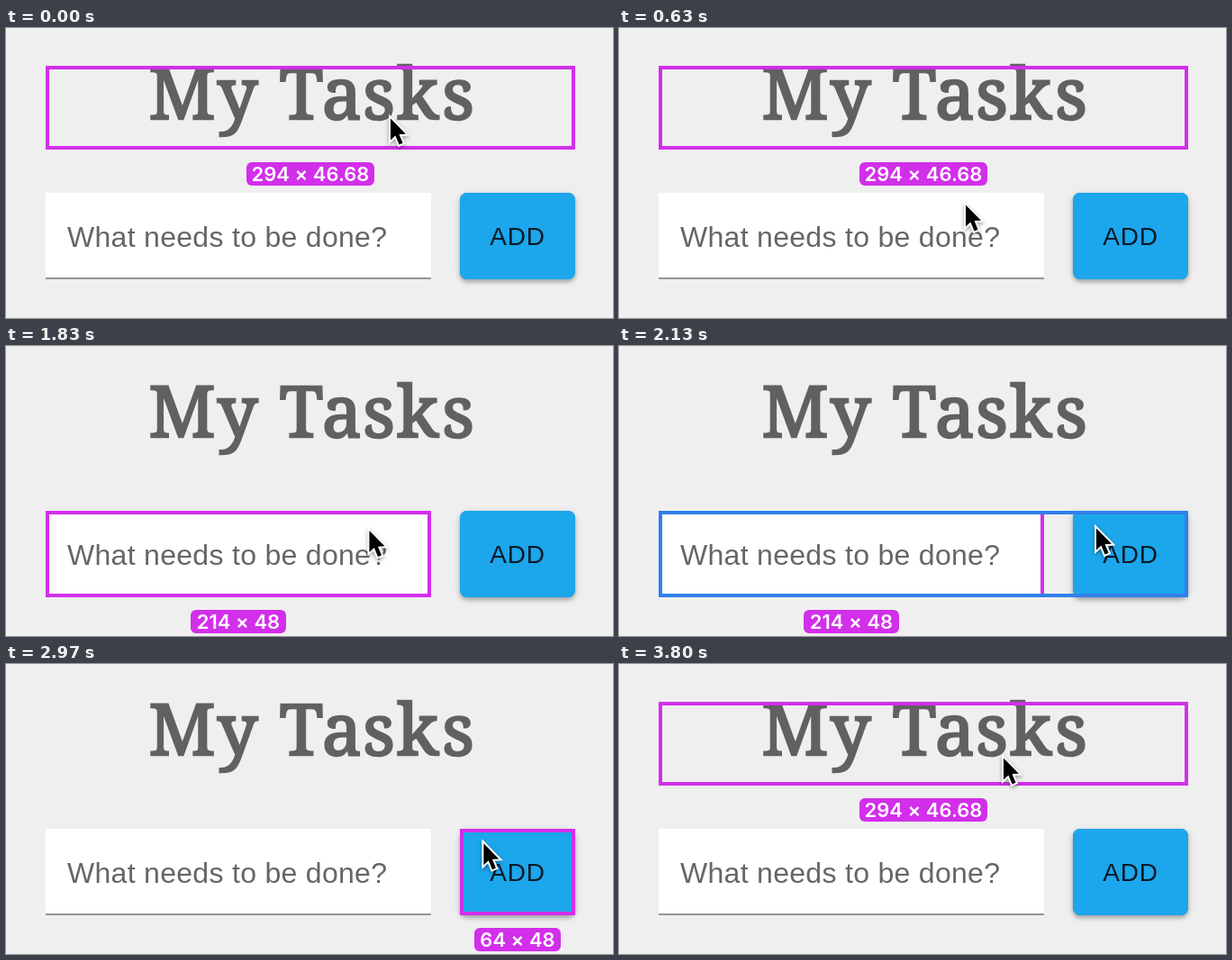
These frames come from a looping animation (674x322 px, 4230 ms). An HTML page with a canvas:

```html
<!DOCTYPE html>
<html lang="en">
<head>
<meta charset="utf-8">
<title>My Tasks</title>
<style>
  html, body { margin: 0; width: 100%; height: 100%; overflow: hidden; background: #efefef; }
  canvas { display: block; }
</style>
</head>
<body>
<canvas id="stage" width="674" height="322" aria-label="My Tasks"></canvas>
<script>
const ctx = document.getElementById('stage').getContext('2d');
const LOOP = 4230;
const PINK = '#d22fea', BLUE = '#317fec', GREY = '#616161';

const TITLE = { x: 44, y: 42, w: 588, h: 93, label: '294 × 46.68', lx: 267, ly: 149, lw: 142 };
const INPUT = { x: 44, y: 183, w: 428, h: 96, label: '214 × 48', lx: 205, ly: 293, lw: 106 };
const BUTTON = { x: 504, y: 183, w: 128, h: 96, label: '64 × 48', lx: 520, ly: 293, lw: 96 };
const ROW = { x: 44, y: 183, w: 588, h: 96 };

// [time, value]: each value holds until the next entry
const selection = [[0, TITLE], [800, INPUT], [2370, BUTTON], [3670, TITLE]];
const hover = [[0, null], [700, ROW], [800, null], [2000, ROW], [2370, null], [3300, TITLE], [3670, null]];

// [time, x, y] of the pointer tip
const path = [
  [0, 425, 97], [70, 425, 97], [570, 384, 190], [600, 384, 190], [630, 383, 193],
  [900, 376, 202], [1130, 376, 202], [1170, 378, 202], [1730, 378, 202],
  [2130, 528, 199], [2200, 531, 200], [2330, 531, 200], [2430, 533, 200],
  [2930, 533, 200], [3230, 438, 112], [3400, 426, 102], [3600, 426, 102],
  [3800, 425, 101], [LOOP, 425, 101]
];

// letters of the heading with their centres
const heading = [['M', 195.5], ['y', 257], ['T', 328], ['a', 373], ['s', 414], ['k', 457], ['s', 502]];

function held(track, t) {
  return track.filter(k => k[0] <= t).pop()[1];
}

function pointerAt(t) {
  const i = Math.max(1, path.findIndex(k => k[0] > t));
  const [t0, x0, y0] = path[i - 1], [t1, x1, y1] = path[i];
  const p = (t - t0) / (t1 - t0), e = p * p * (3 - 2 * p);
  return [x0 + (x1 - x0) * e, y0 + (y1 - y0) * e];
}

// thirty updates a second, on a 0 / 30 / 70 ms grid
function snap(t) {
  const r = t % 100;
  return t - r + (r < 30 ? 0 : r < 70 ? 30 : 70);
}

function rect(x, y, w, h, fill) {
  ctx.fillStyle = fill;
  ctx.fillRect(x, y, w, h);
}

function pill(x, y, w, h, r, fill) {
  ctx.fillStyle = fill;
  ctx.beginPath();
  ctx.roundRect(x, y, w, h, r);
  ctx.fill();
}

function text(str, x, y, font, fill, align = 'left', spacing = 0) {
  ctx.font = font;
  ctx.fillStyle = fill;
  ctx.textAlign = align;
  ctx.letterSpacing = spacing + 'px';
  ctx.fillText(str, x, y);
}

function shadow(color, blur, dy) {
  ctx.shadowColor = color;
  ctx.shadowBlur = blur;
  ctx.shadowOffsetY = dy;
}

function outline(b, color) {
  ctx.strokeStyle = color;
  ctx.lineWidth = 4;
  ctx.lineJoin = 'miter';
  ctx.strokeRect(b.x + 2, b.y + 2, b.w - 4, b.h - 4);
}

function drawPage() {
  rect(0, 0, 674, 322, '#efefef');

  ctx.strokeStyle = GREY;
  ctx.lineWidth = 2.5;
  ctx.lineJoin = 'miter';
  for (const [letter, x] of heading) {
    text(letter, x, 101, '79px "Noto Serif", serif', GREY, 'center');
    ctx.strokeText(letter, x, 101);
  }

  rect(44, 183, 428, 96, '#fff');
  rect(44, 277, 428, 2, '#949494');
  text('What needs to be done?', 68, 243, '32px "Liberation Sans", Arial, sans-serif', '#666', 'left', 0.3);

  ctx.save();
  shadow('rgba(0,0,0,.24)', 4, 3);
  pill(504, 183, 128, 96, 8, '#1ca6ec');
  shadow('rgba(0,0,0,.12)', 10, 2);
  pill(504, 183, 128, 96, 8, '#1ca6ec');
  ctx.restore();
  text('ADD', 537.3, 241, '28px "Liberation Sans", Arial, sans-serif', '#0a1a26', 'left', 0.8);
}

function drawLabel(b) {
  pill(b.lx, b.ly, b.lw, 26, 6, PINK);
  text(b.label, b.lx + b.lw / 2, b.ly + 21, '600 22px Inter, sans-serif', '#fff', 'center');
}

function drawPointer([x, y]) {
  ctx.save();
  ctx.translate(x + 2, y + 3.5);
  ctx.beginPath();
  ctx.moveTo(0, 0);
  ctx.lineTo(0, 24);
  ctx.lineTo(5.4, 19);
  ctx.lineTo(9.6, 29);
  ctx.lineTo(13.6, 27.3);
  ctx.lineTo(9.5, 17.6);
  ctx.lineTo(17, 17.2);
  ctx.closePath();
  ctx.strokeStyle = '#fff';
  ctx.lineWidth = 4;
  ctx.lineJoin = 'miter';
  shadow('rgba(0,0,0,.35)', 4, 2);
  ctx.stroke();
  ctx.shadowColor = 'transparent';
  ctx.fillStyle = '#000';
  ctx.fill();
  ctx.restore();
}

function draw(t) {
  const selected = held(selection, t), hovered = held(hover, t);
  drawPage();
  outline(selected, PINK);
  if (hovered) outline(hovered, BLUE);
  drawLabel(selected);
  drawPointer(pointerAt(t));
}

function tick(now) {
  draw(snap(now % LOOP));
  requestAnimationFrame(tick);
}
requestAnimationFrame(tick);
</script>
</body>
</html>
```
